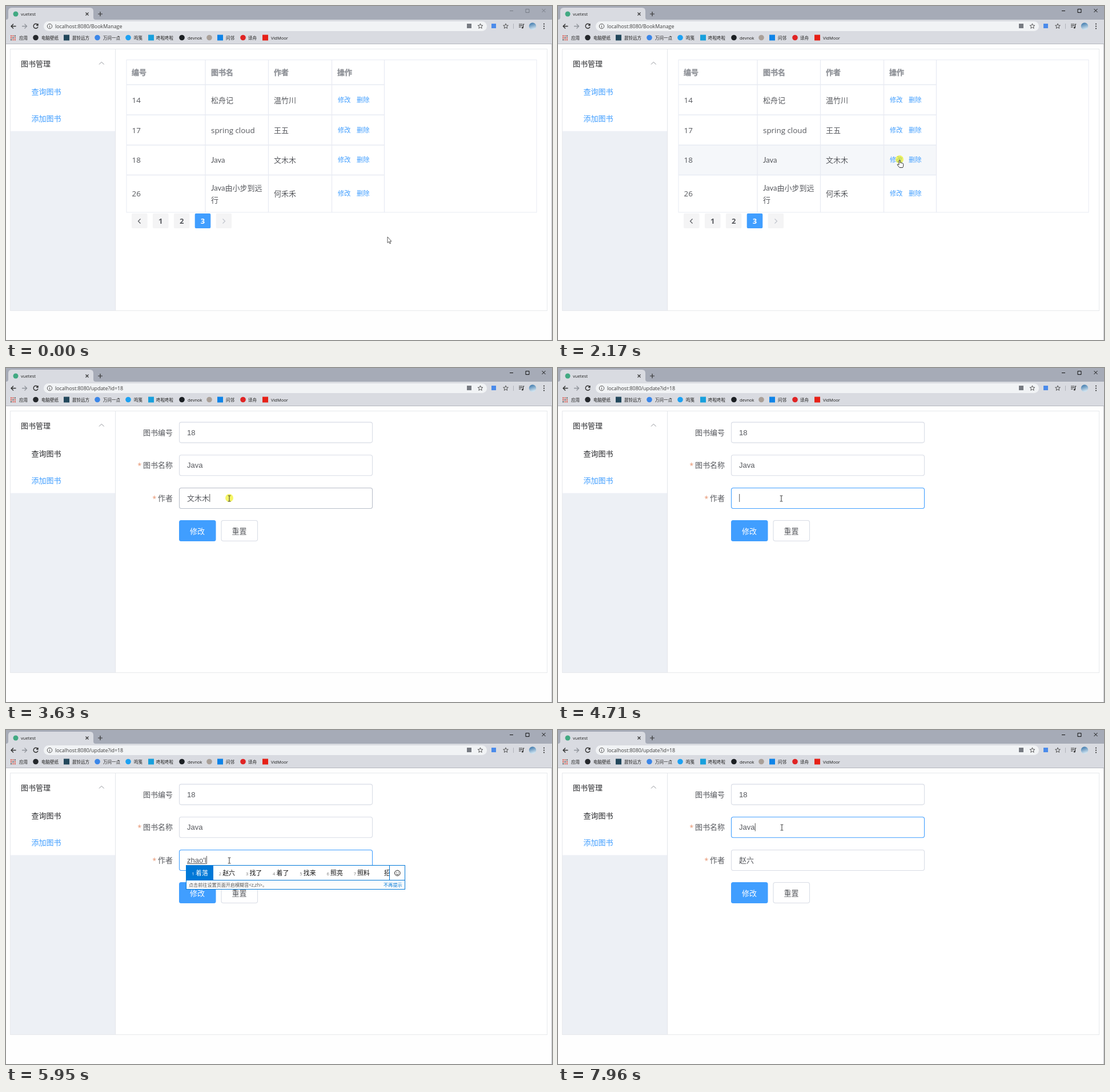
Animation, 956 px wide and 586 px high, one loop 8 s. Source, as an HTML page:

```html
<!DOCTYPE html>
<html lang="zh-CN">
<head>
<meta charset="utf-8">
<style>
html, body { margin: 0; width: 100%; height: 100%; overflow: hidden; background: #fefefe; }
svg { display: block; }
text { font-family: 'Open Sans', 'Noto Sans CJK SC', 'Noto Sans CJK', sans-serif; white-space: pre; }
.title { font-family: Lato, 'Noto Sans CJK SC', 'Noto Sans CJK', sans-serif; }
.input { font-family: 'Liberation Sans', 'Noto Sans CJK SC', 'Noto Sans CJK', sans-serif; }
.head { font-weight: 700; stroke: #909399; stroke-width: .35; }
</style>
</head>
<body>
<svg id="stage" width="956" height="586" viewBox="0 0 956 586"></svg>
<script>
const LOOP = 8000, FOCUS_WINDOW = 2170, OPEN_FORM = 2320, CLICK_AUTHOR = 3630, CLICK_NAME = 7730;
const BLUE = '#409eff', BODY = '#56585d', DARK = '#2b2c2f', LINE = '#e8ebf3', BORDER = '#d8dce5', HOVER = '#b9bec9';
const IME_BLUE = '#0078d7';

const rect = (x, y, w, h, fill, more = '') => `<rect x="${x}" y="${y}" width="${w}" height="${h}" fill="${fill}" ${more}/>`;
const circle = (x, y, r, fill, more = '') => `<circle cx="${x}" cy="${y}" r="${r}" fill="${fill}" ${more}/>`;
const path = (d, stroke, width = 1, more = '') => `<path d="${d}" fill="none" stroke="${stroke}" stroke-width="${width}" ${more}/>`;
const text = (x, y, s, size = 13, fill = BODY, more = '') =>
  `<text x="${x}" y="${y}" font-size="${size}" fill="${fill}" ${more}>${s.replace(/</g, '&lt;')}</text>`;

function star(x, y) {
  const points = Array.from({ length: 10 }, (_, i) => {
    const a = i * Math.PI / 5, r = i % 2 ? 2 : 4.6;
    return `${x + r * Math.sin(a)} ${y - r * Math.cos(a)}`;
  });
  return path(`M${points.join('L')}Z`, '#444', .9);
}

function browser() {
  const bookmarks = [
    [23, '应用'], [62, '电脑壁纸', 52, '#25282c'], [116, '晨铃远方', 106, '#23485c', 1], [170, '万问一点', 160, '#3b86e8'],
    [224, '鸣笺', 214, '#1da1f2'], [263, '咚啦咚啦', 254, '#18a0dc', 1], [318, 'devnok', 308, '#1b1f23'],
    [0, '', 356, '#aaa098'], [385, '问邻', 375, '#0f84e8', 1], [424, '译舟', 415, '#e02424'], [464, 'VidMoor', 454, '#e62117', 1]
  ];
  let out = rect(0, 0, 956, 25, '#a6abb7') + rect(0, 24, 956, 43, '#d9dbe1') + rect(0, 66, 956, 1, '#b4b7bd')
    + '<path d="M0 24Q4 24 4 20V9Q4 3 10 3H147Q153 3 153 9V20Q153 24 157 24V25H0Z" fill="#d9dbe1"/>'
    + circle(17, 14, 4.5, '#41a982') + text(26, 17, 'vuetest', 7.6, '#222')
    + path('M139.500 11.500l5 5m0-5l-5 5', '#333', 1.1) + path('M161 14h8m-4-4v8', '#333', 1.2)
    + path('M17.500 35.500H9m4-4l-4 4 4 4', '#333', 1.4) + path('M28 35.500h8.500m-4-4l4 4-4 4', '#8f939a', 1.3)
    + path('M55.500 33A4 4 0 1 0 56 36.500M56 31v3h-3', '#333', 1.4)
    + rect(66, 27, 776, 17, '#f1f3f5', 'rx="8.500"')
    + circle(76.5, 35.5, 4.2, 'none', 'stroke="#555"') + path('M76.500 35v3m0-5v1', '#555')
    + rect(807, 31, 8, 8, '#777b82') + star(830.5, 35.5) + rect(850, 31, 8, 8, '#4b8bea') + star(875, 35.5)
    + rect(888, 31, 1, 9, '#b0b3ba')
    + path('M898 32h6m-6 2.500h6m-6 2.500h3.500M905.500 38v-6h2', '#333', 1.2) + circle(904.3, 38, 1.5, '#333')
    + circle(922, 35.5, 6.3, 'url(#avatar)')
    + [31.5, 35.5, 39.5].map(y => circle(942, y, 1.1, '#333')).join('');
  for (let i = 0; i < 9; i++)
    out += rect(8 + i % 3 * 3.4, 51.5 + Math.floor(i / 3) * 3.4, 2, 2, ['#d94a3d', '#d94a3d', '#555'][(i + Math.floor(i / 3)) % 3]);
  for (const [x, label, ix, color, square] of bookmarks) {
    out += text(x, 58.5, label, 7.5, '#1c1c1c');
    if (ix) out += square ? rect(ix - 5, 50.5, 10, 10, color) : circle(ix, 55.5, 4.8, color);
  }
  return out;
}

function frame() {
  return rect(7.5, 75.5, 940, 459, '#fff', 'stroke="#e7e9ec"') + rect(8, 76, 184, 458, '#edf0f5')
    + rect(8, 76, 183, 143.5, '#fff') + rect(191, 76, 1, 458, '#e3e6ea')
    + text(26, 106, '图书管理', 13, DARK) + path('M163 102.500l4.300-4.300 4.300 4.300', '#909399')
    + text(44.5, 155.3, '查询图书', 13, BLUE, 'id="query"') + text(44.5, 201.5, '添加图书', 13, BLUE);
}

const rows = [
  [138, 191, 165, '14', '松舟记', '温竹川'],
  [191, 244, 218, '17', 'spring cloud', '王五'],
  [244, 296.5, 270.5, '18', 'Java', '文木木'],
  [296.5, 362, 329.5, '26', 'Java由小步到远', '何禾禾']
];

function table() {
  let out = rect(211, 94.5, 718, 267.5, '#fff');
  rows.forEach(([y, bottom], i) => out += rect(211, y, 451.5, bottom - y, '#f5f7fa', `id="row${i}"`));
  out += rect(211, 94.5, 718, 267.5, 'none', `stroke="${LINE}"`);
  out += path('M349 94V362M459.500 94V362M570.500 94V362M662.500 94V362M211 138H662M211 191H662M211 244H662M211 296.500H662', LINE, 1.3);
  ['编号', '图书名', '作者', '操作'].forEach((s, i) =>
    out += text([220, 359, 469, 580][i], 121.2, s, 13, '#909399', 'class="head"'));
  rows.forEach(([, , y, id, title, author], i) => {
    const java = title.startsWith('Java');
    out += text(220.5, y + 4.5, id, 13.4)
      + text(359, y + (i == 3 ? -5.5 : 4.5), title, i == 1 ? 13.4 : 13, BODY, java ? 'class="title"' : '')
      + text(469, y + 4.5, author)
      + text(581, y + 3.5, '修改', 11.2, BLUE) + text(614, y + 3.5, '删除', 11.2, BLUE);
  });
  out += text(359, 345, '行');
  for (let i = 0; i < 5; i++) {
    const x = 220 + i * 36.9;
    out += rect(x, 364, 27.6, 26, i == 3 ? BLUE : '#f4f4f5', 'rx="2"');
    if (i % 4) out += text(x + 13.8, 382, String(i), 13, i == 3 ? '#fff' : BODY, 'font-weight="700" text-anchor="middle"');
  }
  return out + path('M235.500 373.500l-4 4 4 4', BODY, 1.2) + path('M379.500 373.500l4 4-4 4', '#c0c4cc', 1.2);
}

function form() {
  const field = (y, label, value, id, required) =>
    text(292, y + 22.5, label, 13, BODY, 'text-anchor="end"')
    + (required ? text(required, y + 23, '*', 12, '#e6906a') : '')
    + rect(303.5, y, 338, 36, '#fff', `rx="3.500" stroke="${BORDER}" stroke-width="1.100" id="${id}Box"`)
    + text(317, y + 22.5, value, 13, BODY, `class="input" id="${id}"`);
  return field(95.1, '图书编号', '18', 'number') + field(152.7, '图书名称', 'Java', 'name', 230.5)
    + field(210.5, '作者', '', 'author', 256.5)
    + rect(303, 267, 64.5, 37, BLUE, 'rx="3.500"') + text(322, 290.5, '修改', 13, '#fff')
    + rect(377, 267.5, 63.5, 36, '#fff', `rx="3.500" stroke="${BORDER}" stroke-width="1.100"`) + text(395.5, 290.5, '重置')
    + path('', '#555', 1, 'id="underline"') + rect(0, 0, .9, 14, '#444', 'id="caret"') + '<g id="ime"></g>';
}

const pointers = {
  arrow: '<path d="M0 0V10.500L2.400 8.400 4 12 5.500 11.400 4 7.900H7Z" fill="#fff" stroke="#333" stroke-width=".8"/>',
  beam: path('M-2.300-5H-.7L0-4.500.7-5H2.300M0-4.500V4.500M-2.300 5H-.7L0 4.500.7 5H2.300', '#333', 1),
  hand: '<path d="M-1 1Q0-.8 1 1V5Q2.300 4.200 3 5.600 4.400 4.800 5 6.200 6.600 5.800 6.700 7.500V10Q6.500 12 5.500 13.500H0L-3.600 9.200Q-4.400 7.600-2.800 7.500L-1 8.800Z" fill="#fff" stroke="#222" stroke-width=".9"/>'
};

const stage = document.getElementById('stage');
stage.innerHTML = '<defs><linearGradient id="avatar" x2="0.300" y2="1"><stop stop-color="#2f6ea5"/><stop offset="1" stop-color="#cfe3f0"/></linearGradient>'
  + '<clipPath id="list"><rect x="316" y="238" width="355.500" height="25"/></clipPath></defs>'
  + rect(0, 0, 956, 586, '#fefefe') + browser() + frame()
  + text(86, 38.8, '', 8.9, '#3c3c3c', 'id="url"')
  + path('M882 8.500h6M910 5.500h6v6h-6zM938.500 5l6 6m0-6l-6 6', '#222', 1, 'id="controls"')
  + `<g id="table">${table()}</g><g id="form">${form()}</g>` + rect(955, 67, 1, 519, '#c3c5c9')
  + circle(0, 0, 7, '#f0f000', 'id="press" opacity=".600"')
  + Object.entries(pointers).map(([id, s]) => `<g id="${id}">${s}</g>`).join('');
const el = id => document.getElementById(id);
const set = (id, name, value) => el(id).setAttribute(name, value);
const show = (id, on) => set(id, 'visibility', on ? 'visible' : 'hidden');

const route = [
  [0, 668, 405], [60, 668, 405], [220, 578, 399], [469, 578, 399], [470, 587, 407], [900, 587, 407],
  [1160, 626, 282], [1540, 598, 270], [2330, 598, 270], [2550, 470, 236], [2780, 356, 205], [2930, 397, 180],
  [3000, 397, 180], [3090, 403, 176], [3290, 403, 176], [3470, 391, 229], [7269, 391, 229],
  [7270, 389, 223], [7340, 389, 223], [7650, 392, 171], [LOOP, 392, 171]
];

// time, text, candidates, whether the hint line is open
const typing = [
  [0, '文木木'], [4410, '文木'], [4560, '文'], [4710, ''],
  [5260, 'z', '在 这 中 做 再 最 找'], [5410, 'zh', '这 中 之 只 着 真 正'], [5490, 'zha', '炸 扎 渣 眨 闸 诈 乍'],
  [5640, 'zhao', '找 照 赵 招 着 朝 罩 兆 昭 召', true],
  [5950, "zhao'l", '着落 赵六 找了 着了 找来 照亮 照料 招来', true],
  [6180, "zhao'li", '照理 找理 赵丽 照例 招力 找里 招立 照理', true],
  [6260, "zhao'liu", '赵六 找 照 赵 招 着 朝'], [6810, '赵六']
];

const borders = {
  name: [[0, BORDER], [2850, HOVER], [3320, BORDER], [7470, HOVER], [CLICK_NAME, BLUE]],
  author: [[0, BORDER], [2560, HOVER], [2750, BORDER], [3400, HOVER], [CLICK_AUTHOR, BLUE], [CLICK_NAME, BORDER]]
};

const lastBefore = (list, t) => list.filter(k => k[0] <= t).pop();
const channels = hex => [1, 3, 5].map(i => parseInt(hex.slice(i, i + 2), 16));

function borderColor(list, t) {
  const i = list.indexOf(lastBefore(list, t));
  const p = Math.min(1, (t - list[i][0]) / 200);
  const from = channels(list[Math.max(0, i - 1)][1]), to = channels(list[i][1]);
  return `rgb(${from.map((c, n) => Math.round(c + (to[n] - c) * p))})`;
}

function pointerAt(t) {
  const i = route.findIndex(k => k[0] > t), [t0, x0, y0] = route[i - 1], [t1, x1, y1] = route[i];
  const p = (t - t0) / (t1 - t0);
  return [x0 + (x1 - x0) * p, y0 + (y1 - y0) * p];
}

function imeMarkup(words, hint) {
  let x = 316, list = '';
  words.split(' ').forEach((word, i) => {
    const step = word.length > 1 ? 47.2 : 37;
    if (!i) list += rect(x, 238, Math.round(step), 25, IME_BLUE);
    if (i < 7) list += text(x + 9.5, 255, String(i + 1), 7.5, i ? '#777' : '#fff');
    list += text(x + (i < 7 ? 16 : 15.5), 255.3, word, 10.9, i ? '#111' : '#fff');
    x += step;
  });
  // Half-pixel edges keep the one-pixel panel lines crisp.
  const right = hint ? 698.5 : Math.round(x) + 26.5, split = right - 27, outline = `stroke="${IME_BLUE}"`;
  let out = rect(315.5, 237.5, right - 315.5, 26, '#fff', outline)
    + `<g clip-path="url(#list)">${list}</g>` + path(`M${split} 238v25`, IME_BLUE)
    + circle(split + 13.8, 251, 4.8, 'none', 'stroke="#222"')
    + path(`M${split + 11.3} 252.500q2.500 2.500 5 0`, '#222')
    + circle(split + 12.1, 249.5, .7, '#222') + circle(split + 15.5, 249.5, .7, '#222');
  if (hint) out += rect(315.5, 263.5, 383, 16, '#fcfcfc', outline)
    + text(320, 274.5, '点击前往设置页面开启模糊音<z,zh>。', 8.1, '#555') + text(661, 274.5, '不再提示', 8.2, IME_BLUE);
  return out;
}

let shownStep;
function drawForm(t) {
  const step = lastBefore(typing, t), [start, value, words, hint] = step;
  if (step !== shownStep) {
    shownStep = step;
    el('author').textContent = value;
    el('ime').innerHTML = words ? imeMarkup(words, hint) : '';
  }
  for (const id in borders) set(id + 'Box', 'stroke', borderColor(borders[id], t));
  const inName = t >= CLICK_NAME, focused = t >= CLICK_AUTHOR;
  const width = value || inName ? el(inName ? 'name' : 'author').getComputedTextLength() : 0;
  const since = t - (inName ? CLICK_NAME : Math.max(start, CLICK_AUTHOR));
  set('caret', 'x', 317.3 + width);
  set('caret', 'y', inName ? 163.5 : 221);
  set('caret', 'opacity', +(focused && Math.floor(since / 530) % 2 == 0));
  set('underline', 'd', words ? `M317 234.500h${width}` : '');
}

function draw(t) {
  const formOpen = t >= OPEN_FORM, [x, y] = pointerAt(t);
  set('table', 'display', formOpen ? 'none' : 'inline');
  set('form', 'display', formOpen ? 'inline' : 'none');
  set('query', 'fill', formOpen ? DARK : BLUE);
  set('controls', 'stroke', t < FOCUS_WINDOW ? '#777c86' : '#111');
  el('url').textContent = 'localhost:8080/' + (formOpen ? 'update?id=18' : 'BookManage');
  rows.forEach(([top, bottom], i) => set('row' + i, 'opacity', +(x < 662 && y >= top && y < bottom)));
  if (formOpen) drawForm(t);

  const overLink = !formOpen && (x > 580 && x < 604 || x > 613 && x < 637) && rows.some(r => Math.abs(r[2] - y) < 9);
  const overInput = formOpen && x > 303 && x < 641 && (y > 153 && y < 189 || y > 210 && y < 247);
  const kind = overLink ? 'hand' : overInput ? 'beam' : 'arrow';
  for (const id in pointers) {
    show(id, id == kind);
    set(id, 'transform', `translate(${x} ${y})`);
  }
  show('press', [FOCUS_WINDOW, CLICK_AUTHOR, CLICK_NAME].some(c => t >= c && t < c + 150));
  set('press', 'cx', x);
  set('press', 'cy', y - 1);
}

function tick() {
  draw(performance.now() % LOOP);
  requestAnimationFrame(tick);
}
tick();
</script>
</body>
</html>
```
